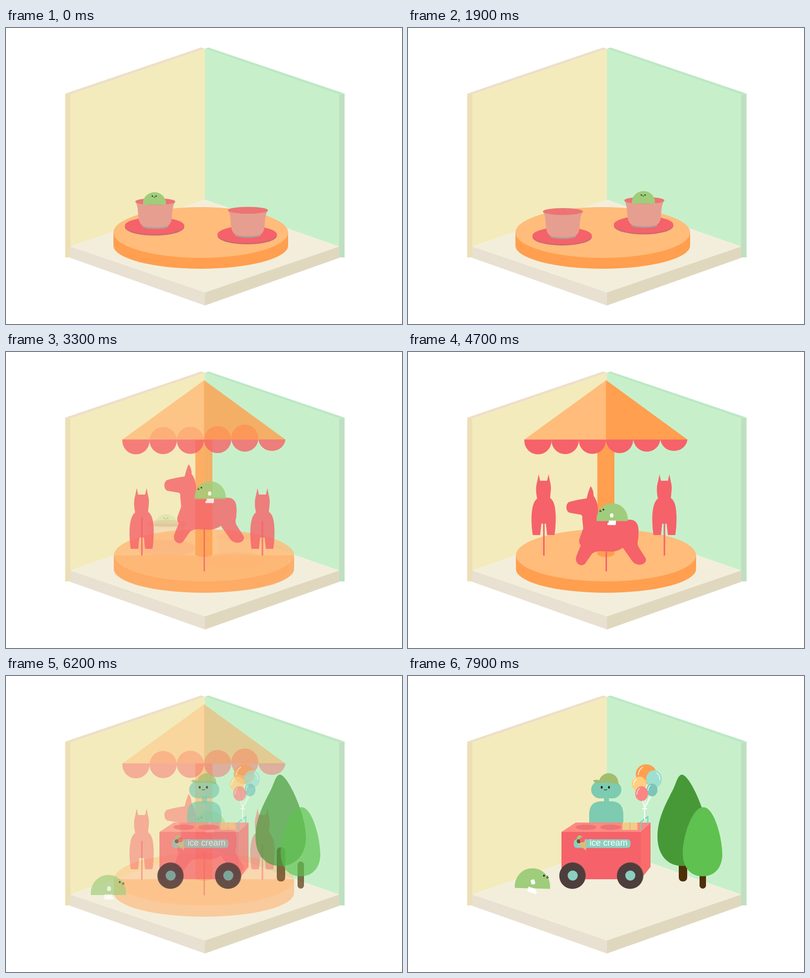
An HTML page with a canvas for the animation above (8 s loop, 800 by 600 pixels).

```html
<!DOCTYPE html>
<html lang="en">
<head>
<meta charset="utf-8">
<title>Little room</title>
<style>
  html, body { margin: 0; width: 100%; height: 100%; overflow: hidden; background: #fff; }
  canvas { display: block; }
</style>
</head>
<body>
<canvas id="stage" width="800" height="600"></canvas>
<script>
const g = document.getElementById('stage').getContext('2d');
const LOOP = 8000, TAU = Math.PI * 2;
const RED = '#f5626a', ORANGE = '#ff9f4f', PEACH = '#ffbc7a', ROSE = '#ec7474',
      LEAF = '#9fcd7b', MINT = '#8ccfc0', SKIN = '#7dcbb0', INK = '#222';

const fade = (t, start, length) => Math.max(0, Math.min(1, (t - start) / length));
const fill = (color, path) => { g.fillStyle = color; g.fill(path); };
const shape = (color, d) => fill(color, new Path2D(d));
const line = (color, width, d) => {
  g.strokeStyle = color;
  g.lineWidth = width;
  g.stroke(new Path2D(d));
};
const oval = (color, x, y, rx, ry = rx) => {
  const p = new Path2D();
  p.ellipse(x, y, rx, ry, 0, 0, TAU);
  fill(color, p);
};
const box = (color, x, y, w, h, r = 0) => {
  const p = new Path2D();
  p.roundRect(x, y, w, h, r);
  fill(color, p);
};
const at = (x, y, draw, { sx = 1, sy = 1, turn = 0 } = {}) => {
  g.save();
  g.translate(x, y);
  g.scale(sx, sy);
  g.rotate(turn);
  draw();
  g.restore();
};

function room() {
  shape('#f3ebbc', 'M130 135L402 42V348L130 443Z');
  shape('#c7f0ca', 'M402 42L673 135V443L402 348Z');
  shape('#f3eedb', 'M130 443L402 348L673 443L402 536Z');
  shape('#eedfc6', 'M119.5 133L394 39.5L402 42L130 135Z');
  shape('#ecdfb6', 'M119.5 133L130 135V465H119.5Z');
  shape('#bce8c4', 'M402 42L409 39.5L684 133L673 135Z');
  shape('#bfdfc0', 'M673 135L684 133V465H673Z');
  shape('#e8e0d1', 'M130 443L402 536V562.5L130 466Z');
  shape('#dfd8bf', 'M402 536L673 443V466L402 562.5Z');
}

function platform(x, y, rx, ry, low) {
  shape(ORANGE, `M${x - rx} ${y}H${x + rx}V${low}A${rx} ${488 - low} 0 0 1 ${x - rx} ${low}Z`);
  oval(PEACH, x, y, rx, ry);
}

// Turn of the cups in degrees: [time, angle, speed]
const TURN = [[0, -31.4, .11], [1200, 114.6, .145], [1800, 208.7, .13],
              [2700, 291.7, .06], [3300, 309.7, .012], [3600, 312, .005]];

function cupAngle(t) {
  const i = Math.max(1, TURN.findIndex(k => k[0] > t));
  const [t0, a0, v0] = TURN[i - 1], [t1, a1, v1] = TURN[i];
  const d = t1 - t0, u = (t - t0) / d, w = 1 - u;
  return (a0 * w * w * (1 + 2 * u) + a1 * u * u * (3 - 2 * u)
    + d * u * w * (v0 * w - v1 * u)) * Math.PI / 180;
}

function cup(guest) {
  oval('#cd6a72', 0, 2.5, 60, 17.5);
  oval(RED, 0, 0, 60, 17);
  oval('#a5a19e', 1.5, 1.5, 26.5, 5);
  shape('#e69e90', 'M-39 -49C-33 -41 -34 -27 -32.5 -16C-31 -6 -27 1 -18 2Q2 5 21 2C30 1 34 -6 35 -16C36 -27 36 -41 42 -49Z');
  oval(ROSE, 1.5, -49, 40.5, 7);
  if (!guest) return;
  shape(LEAF, 'M-23.5 -42.5V-47A23.3 22.5 0 0 1 23 -47V-42.5Z');
  oval(INK, -4.5, -60, 1.3);
  oval(INK, 3, -60, 1.3);
  line(INK, 1, 'M-2.5 -58.5Q-.8 -56.5 1 -58.5');
}

function teacups(t) {
  platform(393.5, 414.5, 176.5, 51.5, 441);
  const a = cupAngle(t), x = -109.5 * Math.cos(a);
  const y = Math.sin(a) * (Math.sin(a) > 0 ? 24.5 : 17);
  at(393.7 - x, 409.7 - y, () => cup(false));
  at(393.7 + x, 409.7 + y, () => cup(true));
}

// Half dome facing left, origin at the middle of its base
function critter(swing, faceX) {
  at(0, 0, () => {
    shape(LEAF, 'M-31.5 0C-33 -20 -19 -36 0 -36S33 -20 31.5 0Z');
    oval(INK, faceX + 6.3, -23.3, 1.7);
    oval(INK, faceX, -22, 1);
    line(INK, 1.2, `M${faceX - 2} -20.5q2 2 4.5 .2`);
  }, { turn: swing * .025 });
  at(-1, -11.5, () => box('#fff', -3.5, -4.3, 7, 8.6, 3.5 - Math.abs(swing) * 2),
    { turn: -swing * .25 });
  at(0, 0, () => shape('#fff', 'M-7 -1H7.5V7Q6 8.5 4 8H-9.5V4L-7 3Z'), { turn: swing * .3 });
}

function sideHorse() {
  shape(RED, `M261 263L264 248L267 261H281L284 248L287 263
    Q290 272 288 286L287 296C296 302 298 316 298.5 335Q298.5 355 296 371H281
    L278.5 348H269.5L267 371H252C249 350 246 308 261 297C258 285 258 272 261 263Z`);
}

function frontHorse() {
  shape(RED, `M326 304C318 307 318 323 326 326L349 330Q353 331 352 338L354 358
    L346 380Q345 388 349 392L341 412C334 428 350 438 358 429L371 410Q376 404 388 404
    L412 405Q425 404 434 397L453 424C464 438 485 430 480 418L466 396Q462 389 465 380
    C468 352 464 340 446 340H383L384 318Q382 300 375 292Q375 280 369 272
    Q364 283 361 297Q345 299 326 304Z`);
}

function carousel(t) {
  platform(400, 412, 182, 53, 440);
  shape(ORANGE, 'M382.5 177H417V411Q400 420 382.5 411Z');
  shape(RED, 'M235 177H290V180A27.5 27.5 0 0 1 235 180Z');
  [[317.5, 179.5], [372.5, 179], [427.5, 177.5], [482.5, 174.5]]
    .forEach(([x, y]) => oval(RED, x, y, 27.5));
  shape(RED, 'M510 177H564.5A27.3 25 0 0 1 510 177Z');
  shape(PEACH, 'M400.5 57L235 177.5H400.5Z');
  shape(ORANGE, 'M400 57L564.5 177.5H400Z');

  const bob = Math.cos(Math.PI * (t - 3200) / 1800);
  box(RED, 273, 334, 3, 79, 1.5);
  box(RED, 516.5, 342, 3, 71, 1.5);
  box(RED, 399, 355, 3, 90, 1.5);
  const sideY = 13.1 + 15.1 * bob, frontY = -21 - 24 * bob;
  at(0, sideY, sideHorse);
  at(244, sideY, sideHorse);
  at(0, frontY, frontHorse);
  at(412.5, 343 + frontY, () => critter(0, -24));
}

function vendor() {
  box(SKIN, 396, 244, 10, 14);
  box(SKIN, 370, 213, 61, 35, 17.5);
  shape(SKIN, 'M366 298V281Q366 254 391 254H410Q435 254 435 281V298Z');
  shape('#a1bd70', 'M374 212Q379 209 386.5 211.5A19.6 19.6 0 0 1 425 217V220Q406 214 388 217Q375 217 374 212Z');
  oval(INK, 391.3, 225.5, 2, 2.7);
  oval(INK, 406, 225.5, 2, 2.7);
  line(INK, 1.2, 'M396 230Q399 232 402 230');
}

function balloons() {
  line('#fff', 1.2, 'M482 218L478 268M496 226L478 268M468 233L478 268M492 243L478 268M473 252L478 268');
  line('#fff', 2, 'M478 264V292M473 269H483');
  [[ORANGE, 481, 199, 21, 20, -1], ['#9fdfd0', 497, 209, 16, 18, 1], ['#ffcf7f', 467, 219, 15, 15, -1],
   ['#7cc5b8', 493, 231, 11, 13, -1], ['#fb8585', 472, 238.5, 13, 15, -1]].forEach(([c, x, y, rx, ry, side]) => {
    oval(c, x, y, rx, ry);
    const edge = side * rx;
    line('#fff', 1.3, `M${x + edge * .75} ${y + 2}Q${x + edge * .72} ${y - ry * .5} ${x + edge * .3} ${y - ry * .72}`);
  });
}

function wheel(x) {
  oval('#6d5048', x + .5, 404.5, 26.3, 26.8);
  oval('#4d3d3d', x - .6, 405, 26.2, 26.6);
  oval(MINT, x + .3, 404.5, 10.2);
}

function cart() {
  shape(RED, 'M310 316H470V412H310Z');
  shape('#ff8a82', 'M310 316L339 297H490L470 316Z');
  shape('#fa6b6b', 'M470 316L490 297V387L470 412Z');
  oval(ROSE, 359.5, 306.5, 21, 5.5);
  oval(ROSE, 409.5, 306.5, 21, 5.5);
  box('#efcd85', 433, 297, 15, 15, 1);
  box('#efcd85', 449, 297, 14.5, 15, 1);
  line('#7dcbc0', 2.2, 'M470 312V296L484.5 285V302');
  box(MINT, 335, 331, 114.5, 17.5, 6);
  shape('#e0bb77', 'M343 340L359 333L360 354Z');
  oval(LEAF, 347, 329, 6);
  oval('#6b4a3a', 345, 335, 4);
  oval(RED, 352, 332, 5.3);
  g.fillStyle = '#fff';
  g.font = '17.7px "Liberation Sans", Arial, sans-serif';
  g.fillText('ice cream', 366.7, 344.3);
  wheel(332.4);
  wheel(448.8);
}

function trees() {
  box('#4f2f08', 547, 347, 17, 69.5, 8);
  shape('#479938', 'M553 200C568 198 606 280 606 326C606 362 586 385 554 385C522 385 504 360 504 326C504 290 520 260 536 229C542 216 545 201 553 200Z');
  box('#4f2f08', 589, 376, 13, 55, 6.5);
  shape('#5fc150', 'M596 266C618 264 635 328 635 361C635 389 619 406 595 406C571 406 555 388 555 359C555 326 574 266 596 266Z');
}

function iceCream(t) {
  vendor();
  cart();
  balloons();
  trees();
  const walk = Math.max(0, t - 6400);
  const swing = Math.sin(TAU * walk / 667);
  at(207 + walk * .0295, 444 - walk * .009, () => critter(-swing, -26.5), { sx: -1.13, sy: 1.13 });
}

function scene(alpha, draw, t) {
  if (alpha <= 0) return;
  g.globalAlpha = alpha;
  draw(t);
  g.globalAlpha = 1;
}

function frame() {
  const t = performance.now() % LOOP;
  const ride = fade(t, 2740, 700);
  g.clearRect(0, 0, 800, 600);
  room();
  scene(1 - ride, teacups, Math.min(t, 3590));
  scene(ride - fade(t, 5800, 740), carousel, t);
  scene(fade(t, 5740, 680), iceCream, t);
  requestAnimationFrame(frame);
}
frame();
</script>
</body>
</html>
```
